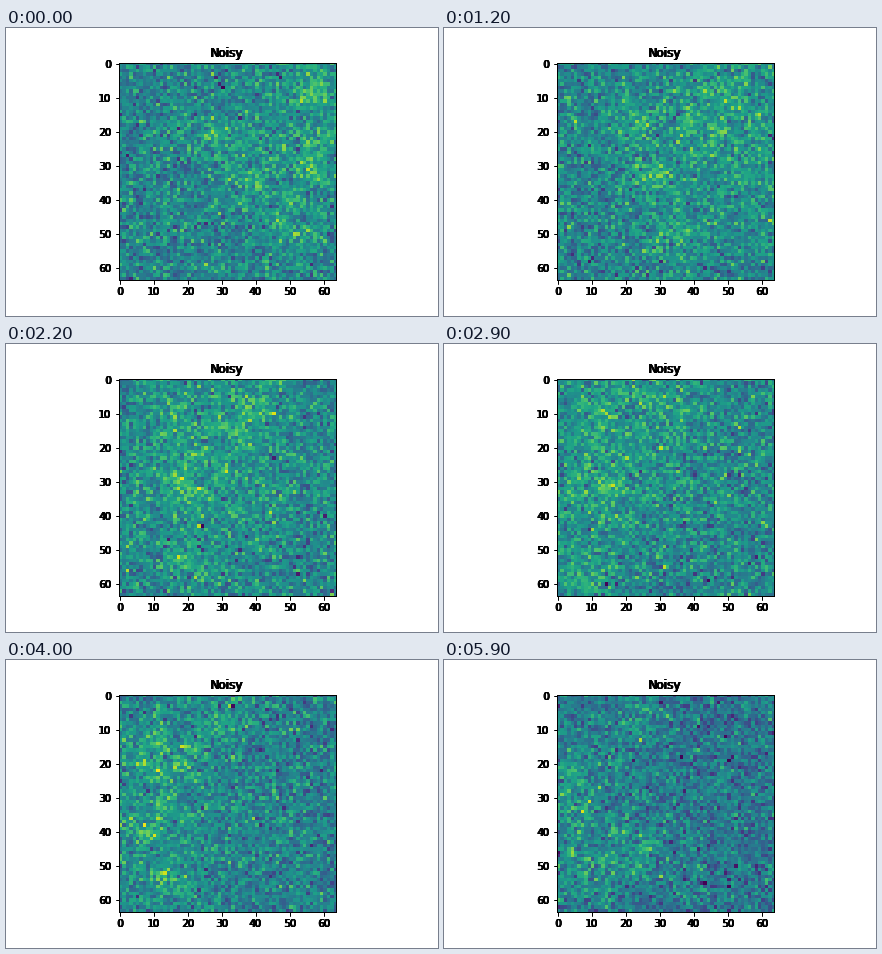
Write a matplotlib script that moves like this. It is 432 px wide and 288 px high and loops after 6000 ms.

```python
import numpy as np
import matplotlib.pyplot as plt
from matplotlib.animation import FuncAnimation

N = 64
FRAMES, STEP = 60, 100
BOX = 0.125, 0.125, 0.775, 0.755

plt.rcParams.update({"font.family": "DejaVu Sans", "font.size": 10})

# Start, middle and end of each drifting patch
KEY_TIMES = 0, 2.9, 5.9
PATHS = (
    ((58, 8), (34, 8), (25, 8)),
    ((28, 24), (12, 8), (3, 24)),
    ((56, 28), (24, 8), (4, 33)),
    ((38, 37), (14, 29), (7, 52)),
    ((52, 45), (9, 58), (24, 47)),
)

Y, X = np.mgrid[:N, :N]


def bump(x, y, r):
    return np.exp(-((X - x) ** 2 + (Y - y) ** 2) / (2 * r * r))


def at(s, keys):
    return np.interp(s, KEY_TIMES, keys)


def field(i):
    s = i * STEP / 1000
    # A wide glow slides from right to left, the patches drift inside it
    glow = bump(7 + 47 / (1 + np.exp((s - 2.1) / 0.35)), 20 + 3 * s, 19)
    patches = np.max([bump(at(s, xs), at(s, ys), 5)
                      for xs, ys in (zip(*path) for path in PATHS)], axis=0)
    ripple = (np.sin(0.55 * X + 0.3 * Y + 0.9 * s)
              + np.sin(0.25 * X - 0.6 * Y + 1.4 * s))
    signal = (0.07 * glow + 0.1 * patches) * (1 + 0.25 * ripple)
    noise = np.random.default_rng(i).normal(0, 0.12, (N, N))
    return at(s, (0.45, 0.46, 0.39)) + signal + noise


def add_axes(shift=0):
    """Add labelled axes; shifted copies show their text only."""
    left, *rest = BOX
    ax = fig.add_axes((left + shift / 432, *rest))
    ax.set_aspect("equal")
    ax.set(xlim=(-0.5, N - 0.5), ylim=(N - 0.5, -0.5),
           xticks=range(0, N, 10), yticks=range(0, N, 10))
    ax.set_title("Noisy", fontsize=12)
    ax.patch.set_visible(False)
    if shift:
        ax.spines[:].set_visible(False)
        ax.tick_params(color="none")
    return ax


fig = plt.figure(figsize=(6, 4), dpi=72, facecolor="white")

# Stacked copies give the text its hard, heavy edges
layers = [add_axes(shift) for shift in (0, 0, 0, -1, -1)]
image = layers[0].imshow(field(0), cmap="viridis", vmin=0, vmax=1,
                         interpolation="nearest")


def draw(i):
    image.set_data(field(i))
    return (image,)


anim = FuncAnimation(fig, draw, frames=FRAMES, interval=STEP,
                     repeat=True, repeat_delay=0, blit=False)
plt.show()
```
